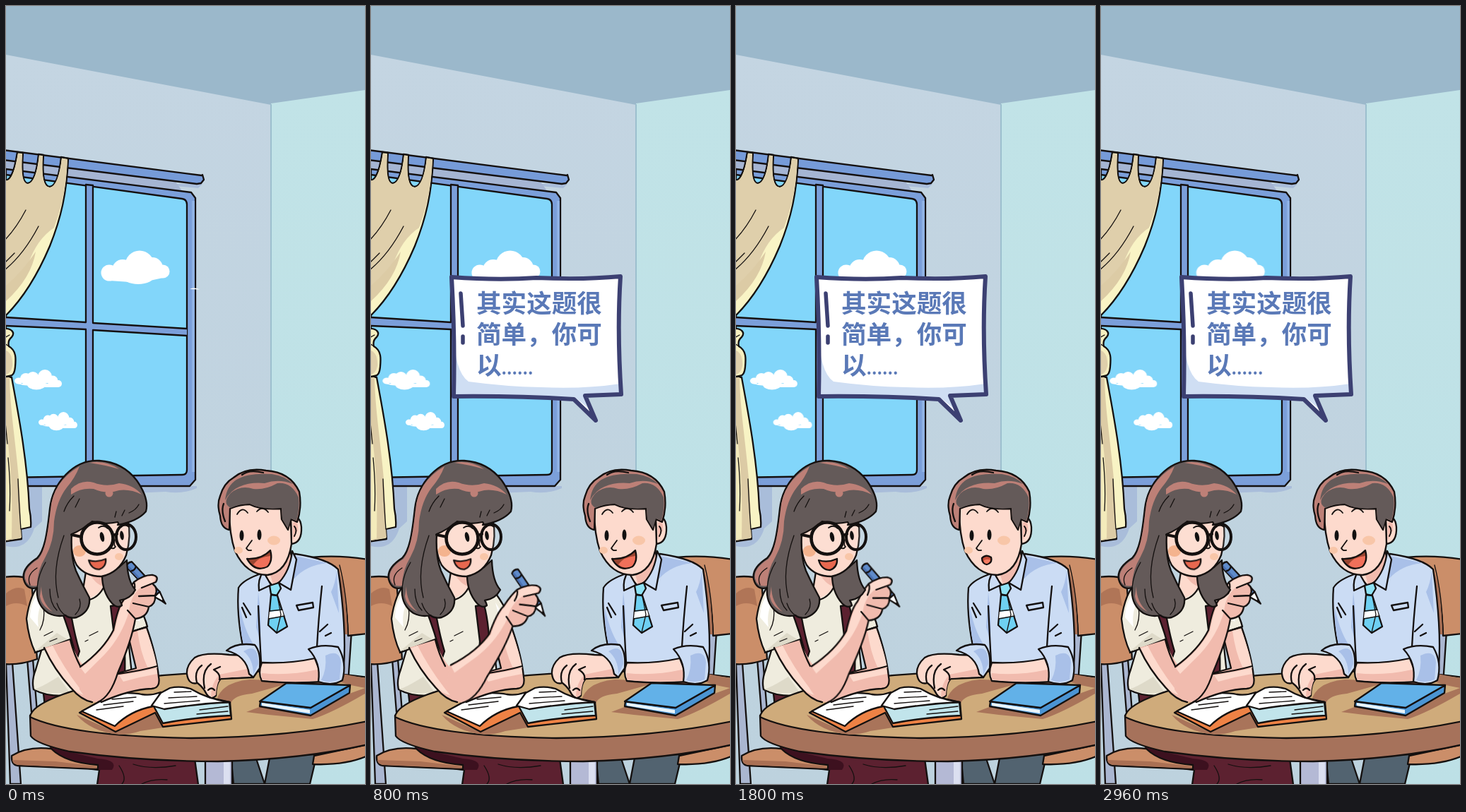
Recreate the animation shown at these times as an HTML page. Size 508 by 1102 pixels, loop 3000 ms.

```html
<!DOCTYPE html>
<html lang="zh-CN">
<head>
<meta charset="utf-8">
<title>讲题</title>
<style>
html,body{margin:0;width:100%;height:100%;overflow:hidden;background:#c3d4e1}
svg{display:block;width:100vw;height:100vh}
.ink{fill:none;stroke:#14100f;stroke-width:2.3;stroke-linecap:round;stroke-linejoin:round}
.ink .n{stroke:none}
.ink .l{fill:none}
.thin{stroke-width:1.3}
.skin{fill:#fddacd}.blush{fill:#f1bbae}
.hair{fill:#645a59}.sheen{fill:#bd8077}
.shirt{fill:#efecde}.dim{fill:#dedac9}
.blue{fill:#cbdcf4}.haze{fill:#a9c0e8}
.wine{fill:#5c2130}.wood{fill:#cb8e69}.steel{fill:#aab6d0}
#bubble{transform-origin:318px 588px}
#hand{transform-origin:125px 985px}
#smile{transform-origin:117px 785px}
#bubble text{font:700 35.6px "Noto Sans CJK SC","Noto Sans CJK",sans-serif;fill:#5a79b7}
</style>
</head>
<body>
<svg viewBox="0 0 508 1102">
<defs>
  <linearGradient id="wall" x2="0" y2="1"><stop stop-color="#c4d5e2"/><stop offset="1" stop-color="#bdd2de"/></linearGradient>
  <linearGradient id="side" x2="0" y2="1"><stop stop-color="#c1e3e7"/><stop offset="1" stop-color="#bde0e6"/></linearGradient>
  <g id="puff" fill="#fff">
    <ellipse cx="6" cy="16" rx="6" ry="4.500"/><circle cx="16" cy="13" r="8"/><circle cx="26" cy="12" r="9"/>
    <circle cx="43" cy="10" r="10"/><circle cx="54" cy="16" r="7.500"/><circle cx="62" cy="20" r="5"/>
    <ellipse cx="31" cy="21" rx="13" ry="7.500"/><path d="M5 20H62V25H44L12 22Z"/>
  </g>
</defs>

<!-- room -->
<path fill="#9bb8cb" d="M0 0H508V160H0Z"/>
<path fill="url(#wall)" d="M0 69L375 140V1102H0Z"/>
<path fill="url(#side)" d="M375 138L508 119V1102H375Z"/>
<path stroke="#9cbfce" stroke-width="2" d="M375 139V700"/>

<!-- window -->
<path fill="#a9bdda" d="M180 680H270V683Q250 692 226 688L180 690ZM0 765Q30 772 40 740L51 730V680H0ZM240 252L278 252L272 258L240 255Z"/>
<g class="ink" stroke-width="1.8">
  <path class="n" fill="#a5b5d3" d="M0 219L240 249L250 263L0 231Z"/>
  <path fill="#7b9fda" d="M0 231L262 264L268 272V671L260 680H0Z"/>
  <path class="n" fill="#8fb2e4" d="M263 276H267V660H263Z"/>
  <path fill="#82d6fa" d="M0 239L249 273Q256 274 256 281V657Q256 664 249 664L0 668Z"/>
</g>
<g id="c1" fill="#fff">
  <circle cx="146" cy="378" r="11.500"/><circle cx="165" cy="374" r="15"/><circle cx="189" cy="367" r="20.500"/>
  <circle cx="207" cy="371" r="15"/><circle cx="222" cy="376" r="9.500"/><ellipse cx="187" cy="382" rx="23" ry="12"/>
  <path d="M146 375H222V385L190 392L146 389Z"/>
</g>
<g id="c2"><use href="#puff" x="12" y="515"/></g>
<g id="c3"><use href="#puff" transform="translate(46 575) scale(.82 .92)"/></g>
<g class="ink" stroke-width="1.8">
  <path fill="#7b9fda" d="M113 253L123 254V666H113Z"/>
  <path class="n" fill="#7b9fda" d="M0 441L113 448L256 457V467L123 459L0 453Z"/>
  <path class="l" d="M0 441L113 448M123 449L256 457M0 453L113 458M123 459L256 467"/>
  <path fill="#769bd8" d="M-4 204L277 240L278 239L280 246L276 251L270 252L-4 218Z"/>
</g>
<path fill="#fff" d="M260 401Q267 398 274 401.500Z"/>

<!-- curtain -->
<g class="ink">
  <path fill="#f8f3c4" d="M-5 524L8 526C16 570 30 640 33 712Q36 726 35 738L21 741L22 755L-5 759Z"/>
  <path class="n" fill="#dccba5" d="M0 526H5C6 590 22 660 21 741L22 753L0 757Z"/>
  <path class="n" fill="#f3eabb" d="M0 600Q10 660 8 754L0 756Z"/>
  <path class="l thin" d="M3 640Q7 680 5 715M-1 590L2 620M21 741Q18 700 17 670"/>
  <path fill="#f9f4c5" d="M-5 246Q9 254 16 207L24 208Q21 252 31 251Q42 249 46 210L53 211Q50 256 62 256Q74 254 78 214L88 216C86 265 78 300 62 340C45 380 25 415 -5 443Z"/>
  <path class="n" fill="#dfcfab" d="M0 247Q10 250 17 209L23 210Q20 252 31 252Q43 250 47 212L52 212Q49 257 62 257Q74 255 79 216L87 217C85 262 77 290 68 314Q44 330 32 364Q20 385 0 410Z"/>
  <path class="n" fill="#dccba5" d="M42 348Q36 385 0 418V396Q22 378 42 348Z"/>
  <path class="l thin" d="M28 289Q15 314 -2 332M46 312Q25 352 -2 374M12 350L-2 364"/>
  <path fill="#f6efc0" d="M-5 457C9 456 13 463 8 469Q2 474 4 482C15 488 14 500 13 511Q12 524 5 524L-5 526Z"/>
  <path class="n" fill="#dfcfab" d="M0 488Q10 492 9 510Q7 520 0 522Z"/>
  <path class="l thin" d="M4 482L-2 478M5 466L-2 470"/>
</g>

<!-- chairs and legs -->
<g class="ink">
  <path class="steel" d="M0 930L9 930L21 1102H6Z"/>
  <path class="steel" d="M30 925H38L44 1000H36Z"/>
  <path class="wood" d="M-4 809Q20 806 36 812L44 925Q20 934 -4 932Z"/>
  <path class="n" fill="#b07557" d="M0 832Q14 820 26 826L30 850Q14 842 0 850Z"/>
  <path class="steel" d="M478 885H489L484 960H474Z"/>
  <path class="wood" d="M432 781Q470 777 512 784V889L484 892Q482 830 466 795Z"/>
  <path class="n" fill="#a86f54" d="M455 786Q474 796 480 832L484 890H476Z"/>
  <path class="l thin" d="M472 792Q483 835 484 890"/>
  <path fill="#526370" d="M318 1060H352L366 1102H322ZM366 1102L374 1060H440L430 1102Z"/>
  <path class="wood" d="M436 1062L512 1046V1062Q480 1076 434 1074Z"/>
  <path fill="#b4b9d5" d="M282 1060H320V1110H282Z"/>
  <path class="n" fill="#dbdff0" d="M308 1071H317V1102H308Z"/>
  <path class="wine" d="M58 1030H262L273 1110H128L132 1082Q80 1078 62 1048Z"/>
  <path class="n" fill="#3d111f" d="M62 1050L130 1066Q160 1068 150 1082L132 1082Q80 1078 62 1050Z"/>
  <path class="l thin" d="M160 1076Q172 1094 164 1102M180 1074Q205 1082 240 1076M192 1102Q208 1094 228 1096"/>
  <path class="wood" d="M8 1062Q30 1048 64 1052Q84 1072 130 1075V1081L16 1076Q7 1074 8 1062Z"/>
  <path class="n" fill="#aa7054" d="M9 1068L70 1070L128 1077V1080L16 1075Q9 1073 9 1068Z"/>
</g>

<!-- girl, body -->
<g class="ink">
  <path class="wine" d="M52 965H180V1000H56Z"/>
  <path class="shirt" d="M50 816Q34 832 29 868Q32 896 41 915L50 913L42 940Q36 955 39 968Q60 980 95 976L180 965L172 888L200 879Q194 855 172 826L140 822L110 850Z"/>
  <path class="n dim" d="M60 908L88 900L104 935L88 962Q60 935 60 908ZM41 914L90 899L72 888ZM40 968Q62 976 90 972L74 950Q52 964 40 968Z"/>
  <path class="n" fill="#fff" d="M46 832Q34 845 34 866L46 880Q42 855 56 838ZM176 845Q186 860 190 872L182 868Z"/>
  <path class="l thin" d="M53 850Q56 870 48 884M54 892L66 886M118 892L130 886M112 900L116 898M62 900L72 896"/>
  <path class="l" d="M41 916L91 897"/>
  <path class="wine" d="M76 850L92 862Q98 895 104 914L100 926Q92 890 76 850Z"/>
  <path class="wine" d="M148 850L160 848Q170 885 168 955L150 965L154 900Z"/>
  <path class="skin" d="M114 795H140V824Q130 845 106 846Z"/>
  <path class="n blush" d="M116 800Q130 812 139 808V822Q126 820 116 800Z"/>
  <path class="n shirt" d="M104 840Q124 842 138 824L150 840L120 864Z"/>
  <path class="l" d="M138 824Q128 842 110 842"/>
</g>

<!-- table -->
<g class="ink">
  <path fill="#a6725b" d="M34 1005L35 1034Q42 1045 90 1056Q190 1070 300 1070Q420 1067 512 1046V1000H60Z"/>
  <path fill="#cfab7b" d="M34 1007C36 988 90 968 150 957Q230 944 330 943Q440 940 512 951V1013Q400 1036 262 1037Q90 1034 34 1007Z"/>
  <g class="n" fill="#a9745a">
    <path d="M100 1004L154 1028L210 1002L222 1022L190 1027Q176 1032 160 1032Q120 1028 100 1004Z"/>
    <path d="M298 984Q304 958 345 954L470 958Q440 962 398 960L348 974Q322 976 318 988Z"/>
    <path d="M340 1000L361 992L430 1006L486 974L508 966V974Q460 1002 434 1010L372 1004Z"/>
    <path d="M476 946L508 952V966L488 962L474 958Z"/>
  </g>
</g>

<!-- books -->
<g class="ink">
  <path fill="#ee8245" d="M104 1001L154 973L212 990L232 967L317 986L319 1010L222 1021L211 1001L155 1028Z"/>
  <path fill="#fff" d="M107 999L153 974Q178 972 192 975Q206 977 219 972L208 992Q176 998 154 1020Z"/>
  <path fill="#c1e4eb" d="M208 990L222 1016Q262 1008 318 1005L316 986L220 990Z"/>
  <path fill="#fff" d="M232 966Q246 963 261 967Q286 982 316 986Q272 988 224 996L206 991L219 973Z"/>
  <path class="l thin" d="M150 982L184 979M138 990L180 985M128 997L166 992M238 972L262 971M230 980L270 978M224 988L274 984M274 997L314 992M270 1003L314 999"/>
  <path fill="#4b94d3" d="M360 985L431 994L487 962L486 973L431 1005L359 992Z"/>
  <path class="n" fill="#eaf5fb" d="M362 987L430 997V1002L362 991Z"/>
  <path fill="#62b1e8" d="M359 985L397 959L487 962L431 994Z"/>
</g>

<!-- boy, body -->
<g class="ink">
  <path class="blue" d="M364 803Q336 812 329 824Q326 860 335 906L358 918L362 935L440 930L478 935Q482 880 470 798Q456 783 409 776L392 800Z"/>
  <path class="n haze" d="M409 779L455 789Q424 792 407 812L402 790ZM331 852Q338 890 357 914L346 907L336 904Q330 880 331 852ZM468 800L471 860L460 830Q466 818 468 800ZM357 830Q362 870 360 900L354 880Z"/>
  <path class="l" d="M357 850Q359 895 361 930M447 822Q442 870 440 908M334 852L340 866M336 846L346 862M444 886L455 876M452 892L460 888"/>
  <path class="skin" d="M372 790L402 768L405 790Q398 812 377 821L364 806Z"/>
  <path class="n blush" d="M374 806Q396 800 402 775L404 790Q396 812 378 819Z"/>
  <path class="blue" d="M364 801Q356 812 358 828L375 820ZM405 772L411 784L403 827L386 817Q402 800 405 772Z"/>
  <path fill="#8ee2f5" d="M373 821L386 817L389 825L383 835L375 833Z"/>
  <path fill="#6ed0f2" d="M375 834L384 835L398 879L383 888L371 877Z"/>
  <path fill="#fff" class="n" d="M373 858L391 856L393 864L372 867Z"/>
  <path class="l thin" d="M373 857L391 855M372 868L394 864M384 836L389 862L383 887"/>
  <path class="l" d="M411 849L434 845L435 852L414 856Z"/>
  <path class="skin" d="M437 924Q400 932 362 930Q356 945 362 956Q400 960 450 957Z"/>
  <path class="n blush" d="M362 945Q400 949 440 940L448 955Q400 959 362 954Z"/>
  <path class="blue" d="M428 911Q446 903 470 908Q483 930 476 955Q462 964 442 957Q446 930 428 911Z"/>
  <path class="n haze" d="M452 920Q472 910 474 930L472 954Q458 960 446 955Q454 940 452 920Z"/>
  <path class="skin" d="M316 919Q280 915 267 923Q255 934 256 946Q258 962 271 959Q280 966 284 975Q290 984 297 977Q297 960 304 953L350 951L346 920Z"/>
  <path class="n blush" d="M302 947L346 938L348 949L304 952Q298 958 297 976L290 979Q290 960 302 947Z"/>
  <path class="l" d="M277 934Q266 942 270 958M290 932Q276 942 281 966M303 936L294 940Q304 946 302 954M286 969Q291 964 295 969"/>
  <path class="blue" d="M312 913Q326 901 352 905Q361 915 359 938L350 951L344 946Q340 920 312 913Z"/>
  <path class="n haze" d="M342 911Q357 905 357 932L350 947Q350 925 336 914Z"/>
</g>

<!-- boy, head -->
<g class="ink">
  <path class="skin" d="M403 727Q416 719 418 738Q419 760 404 762Z"/>
  <path class="n blush" d="M406 732Q414 728 413 742L406 757Z"/>
  <path class="skin" d="M316 706Q315 745 324 772Q340 806 370 806Q398 802 404 762L402 700L350 690Z"/>
  <path class="sheen" d="M316 742Q304 740 303 722Q298 706 303 694Q308 676 322 668Q340 653 368 658Q402 660 415 688Q419 710 412 731L403 727L399 742L390 727L389 712Q360 714 345 706Q330 706 317 712Z"/>
  <path class="n hair" d="M318 711Q305 704 318 690Q332 678 350 684Q366 686 384 676Q404 674 414 696Q416 712 411 729L403 726L399 740L391 727L390 711Q362 714 345 705Q330 705 318 711ZM326 671Q342 661 376 663Q396 666 406 677Q386 669 366 676Q346 674 330 681Q318 686 310 700Q312 680 326 671Z"/>
  <path class="l" d="M308 705Q304 715 310 730M334 664Q344 656 364 661"/>
  <path class="l" stroke-width="1.8" d="M327 720Q334 708 342 718M355 716Q363 707 371 717M348 757L340 768Q342 772 347 771M408 737Q413 742 408 751"/>
  <g class="n"><ellipse cx="333.500" cy="750" rx="3" ry="7.500" fill="#111"/><ellipse cx="358.500" cy="749" rx="3" ry="7.500" fill="#111"/>
  <ellipse cx="379" cy="757" rx="9" ry="6.500" fill="#f8c6a8"/><ellipse cx="329" cy="771" rx="6" ry="5" fill="#f8c6a8"/></g>
  <g id="wide">
    <path fill="#9c4631" d="M341 783Q362 784 374 771Q378 786 370 794Q352 803 341 783Z"/>
    <path class="n" fill="#f0705a" d="M350 791Q358 780 374 779Q374 790 368 794Q358 798 350 791Z"/>
  </g>
  <g id="tight">
    <path fill="#c8503a" d="M348 782Q354 776 361 781Q363 789 355 791Q348 790 348 782Z"/>
    <path class="n" fill="#f57c62" d="M350 786Q355 782 360 785Q358 790 354 790Q351 789 350 786Z"/>
  </g>
</g>

<!-- girl, arms -->
<g class="ink">
  <path class="blush" d="M172 888L199 880Q213 920 216 950Q219 966 206 967Q175 968 135 986L122 975L158 945L184 938Z"/>
  <path class="n skin" d="M186 885L198 882Q211 918 214 938L200 936Q190 915 186 885ZM160 948Q190 943 213 938L214 946Q190 950 166 957Z"/>
  <path class="l" d="M158 946Q190 942 214 935M172 888L200 879"/>
  <path class="n blush" d="M54 909L91 898Q98 920 112 938L140 950L126 986Q108 984 92 966Q68 940 54 909Z"/>
  <path class="n skin" d="M56 910L66 906Q84 942 112 976Q100 974 92 964Q70 940 56 910Z"/>
  <path class="l" d="M54 909Q68 940 92 966Q106 983 122 986M91 898Q96 918 105 935"/>
</g>
<g id="hand" class="ink">
  <g transform="translate(174 791) rotate(47)">
    <path fill="#5f8bca" d="M0 -5.500H58V5H0Q-4 0 0 -5.500Z"/>
    <path class="n" fill="#4a70b0" d="M1 1.500H57V4.500H1Z"/>
    <path fill="#fff" d="M58 -5.500L74 0L58 5Z"/><path fill="#14100f" d="M70 -1L76 0L70 1Z"/>
    <path class="l" d="M9 -5Q12 0 9 4"/>
  </g>
  <path class="n blush" d="M103 937Q138 912 152 884Q158 852 166 842Q173 826 181 816Q196 805 208 806Q217 808 212 816L208 819Q216 825 211 835Q212 847 202 851Q200 866 183 868Q178 898 158 945Q148 978 130 986Q115 986 104 968Z"/>
  <path class="n skin" d="M106 938Q140 912 154 885Q160 853 168 842Q174 826 182 817Q198 806 209 808Q213 811 208 816L190 824Q176 836 174 858Q164 892 140 918Q122 936 112 946Z"/>
  <path class="l" d="M105 936Q138 912 152 884Q158 852 166 842Q173 826 181 816Q196 805 208 806Q217 808 212 816L192 824M208 819Q216 825 211 835L188 836M211 836Q212 847 202 851L180 846M202 851Q200 866 183 868L172 856M183 868Q178 898 158 945Q148 978 130 986M181 816Q184 822 180 832"/>
</g>

<!-- girl, head -->
<g class="ink">
  <path class="hair" d="M136 806Q136 830 150 846Q158 854 164 849Q163 845 161 842Q176 840 183 827Q172 815 171 785L160 795Z"/>
  <path class="skin" d="M94 730Q88 770 100 792Q112 808 135 808Q160 803 170 778Q178 750 172 725Z"/>
  <path class="hair" d="M132 644C95 642 66 676 62 712C58 750 54 772 44 782Q22 796 25 812Q29 828 44 824Q42 848 60 860Q72 866 84 863Q90 868 100 866Q120 858 118 838Q108 820 99 800Q91 780 93 748Q108 742 122 730Q140 735 158 731Q160 733 158 735Q186 730 198 716Q203 698 185 672Q165 646 132 644Z"/>
  <path class="n sheen" d="M104 652Q66 674 63 714C59 750 55 772 46 783Q24 797 27 811Q30 824 44 821Q44 800 56 780Q68 758 68 730Q72 700 86 682Q98 668 104 652Z"/>
  <path class="n sheen" d="M92 684Q106 670 124 675Q142 682 160 676Q180 678 192 692Q176 684 160 686Q142 692 124 684Q106 682 92 692ZM118 647Q140 643 160 656Q140 650 118 647ZM50 822Q50 845 66 858Q50 850 48 836Z"/>
  <circle class="n sheen" cx="146" cy="690" r="5.500"/>
  <path class="l thin" d="M82 750Q64 800 74 838M44 824Q46 804 56 788M84 863Q76 858 72 846M34 820Q28 806 44 796M96 694Q86 704 82 716M104 698L98 710M174 718Q184 714 188 706M164 722L168 714M154 724L156 716M62 826Q62 846 72 856M104 840Q108 852 98 862"/>
  <g class="n"><ellipse cx="104" cy="772" rx="9" ry="8" fill="#f4b38e"/><ellipse cx="160" cy="780" rx="6" ry="5" fill="#f8c6a8"/></g>
  <circle cx="129" cy="754" r="22.500" fill="#fff" fill-opacity=".1" stroke-width="4.600"/>
  <ellipse cx="170" cy="752" rx="14" ry="18" fill="#fff" fill-opacity=".1" stroke-width="4"/>
  <path class="l" stroke-width="4" d="M93 749L107 752M151 750L157 748"/>
  <g class="n" fill="#111"><ellipse cx="136" cy="752" rx="3" ry="7" transform="rotate(-12 136 752)"/><ellipse cx="164" cy="750" rx="2.700" ry="6.500" transform="rotate(-8 164 750)"/></g>
  <path class="l" d="M131 739Q138 734 144 740M163 738Q168 733 174 738M154 756Q152 764 155 766Q152 770 148 767" stroke-width="1.8"/>
  <path id="smile" fill="#e8684f" d="M117 785Q130 789 143 783Q144 795 133 799Q121 799 117 785Z"/>
</g>

<!-- speech -->
<g id="bubble">
  <path fill="#fff" d="M116 385Q180 390 234 386Q300 389 353 383Q348 460 355 550L302 552L318 588L287 556Q200 552 117 554Q122 470 116 385Z"/>
  <path fill="#cfdef3" d="M117 460Q118 518 138 532Q190 539 240 540Q300 543 353 535V550L302 551L312 573L288 554L118 553Z"/>
  <path fill="none" stroke="#3c4072" stroke-width="6" stroke-linejoin="round" d="M114 384Q180 389 234 385Q300 388 353 383Q348 460 354 550L303 552L318 587L287 557Q200 552 117 553Q119 470 114 384Z"/>
  <path fill="none" stroke="#3c4072" stroke-width="5.500" stroke-linecap="round" d="M127 407L130 453M130 468V477"/>
  <text x="149" y="434">其实这题很</text>
  <text x="149" y="478">简单，你可</text>
  <text x="149" y="522">以<tspan font-size="23">......</tspan></text>
</g>
</svg>
<script>
const LOOP = 3000;
const play = (id, frames) => document.getElementById(id)
  .animate(frames, {duration: LOOP, iterations: Infinity});

// drift out to dx at time peak, then back
const drift = (id, dx, peak) => play(id, [
  {transform: 'translateX(0px)'},
  {transform: `translateX(${dx}px)`, offset: peak / LOOP},
  {transform: 'translateX(0px)'}
]);
drift('c1', 13.5, 1370);
drift('c2', 8.9, 1640);
drift('c3', 6.8, 1850);

play('hand', [0, 9, 0, 9, 0].map(a => ({
  transform: `rotate(${a}deg)`, easing: 'cubic-bezier(.65,0,.35,1)'
})));

play('bubble', [
  {transform: 'scale(0)'},
  {transform: 'scale(1)', offset: 800 / LOOP},
  {transform: 'scale(1)'}
]);

// mouths switch every 200 ms
const beats = LOOP / 200;
const flip = (id, key, even, odd) => play(id, Array.from({length: beats + 1}, (_, i) => ({
  [key]: i % 2 && i < beats ? odd : even, offset: i / beats, easing: 'step-end'
})));
flip('wide', 'opacity', 1, 0);
flip('tight', 'opacity', 0, 1);
flip('smile', 'transform', 'scale(.93)', 'scale(1)');
</script>
</body>
</html>
```
